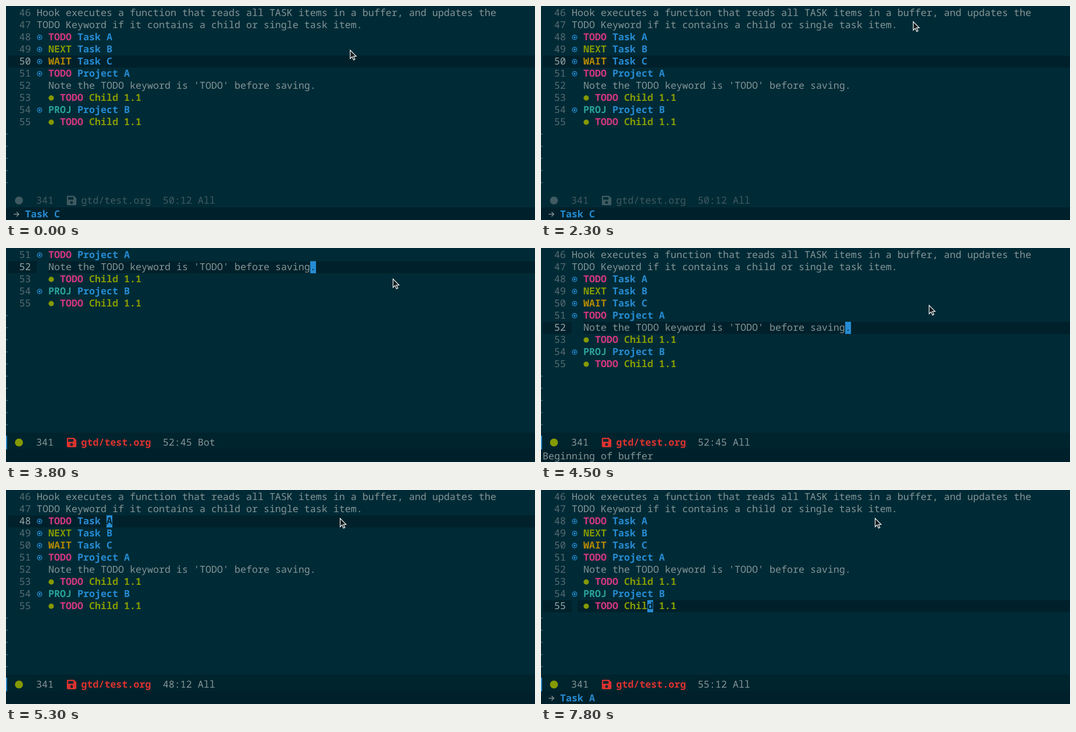
Write an HTML page that moves like this. It is 1000 by 406 pixels and loops after 8 s.

```html
<!DOCTYPE html>
<html lang="en">
<head>
<meta charset="utf-8">
<title>Task buffer</title>
<style>
  html, body { margin: 0; width: 100%; height: 100%; overflow: hidden; background: #002b36; }
  svg { display: block; width: 1000px; height: 406px; }
  text {
    font: 18.333px "Fira Code", "Fira Mono", "Noto Sans Mono", "DejaVu Sans Mono", monospace;
    text-rendering: geometricPrecision;
    white-space: pre;
    font-variant-ligatures: none;
    fill: #839496;
  }
  .bold { font-weight: 700; }
  .num { fill: #566b73; }
  .num.current { fill: #96a7a9; }
  .TODO { fill: #d33682; }
  .NEXT { fill: #859900; }
  .WAIT { fill: #b58900; }
  .PROJ { fill: #2aa198; }
  .level1 { fill: #268bd2; }
  .level2 { fill: #859900; }
  .bg { fill: #002b36; }
  .dark { fill: #00212b; }
  .blue { fill: #268bd2; }
  #cursor text { fill: #00212b; }

  #bar .back { fill: #002b36; }
  #bar .accent { fill: none; }
  #bar text, #bar .dot, #bar .disk { fill: #405a61; }
  #bar.active .back { fill: #00242e; }
  #bar.active .accent { fill: #268bd2; }
  #bar.active text { fill: #839496; }
  #bar.active .dot { fill: #859900; }
  #bar.active .disk, #bar.active .file { fill: #dc322f; }
  #bar.active .file { font-weight: 700; }
</style>
</head>
<body>
<svg viewBox="0 0 1000 406">
  <rect class="bg" width="1000" height="406"/>
  <g id="buffer">
    <rect id="line" class="dark" x="3" width="997" height="23"/>
    <g id="rows"></g>
    <g id="cursor">
      <rect class="blue" width="11" height="23"/>
      <text y="17"></text>
    </g>
  </g>
  <g id="bar">
    <rect class="back" y="350" width="1000" height="33"/>
    <rect class="accent" y="356" width="2" height="27"/>
    <circle class="dot" cx="24.5" cy="369" r="7.6"/>
    <text x="57" y="375">341</text>
    <path class="disk" fill-rule="evenodd" d="M117 360H128.500L133 364.500V376Q133 378 131 378H117Q115 378 115 376V362Q115 360 117 360ZM117.500 362.500V367.500H127.500V362.500ZM124 370.300a2.600 2.600 0 1 0 .01 0Z"/>
    <text class="file" x="142" y="375">gtd/test.org</text>
    <text id="place" x="296.500" y="375"></text>
  </g>
  <rect class="dark" y="383" width="1000" height="23"/>
  <rect y="382" width="1000" height="1" fill="#001e27"/>
  <g id="echo">
    <path d="M14.500 395H24M20 390.700L24.300 395L20 399.300" fill="none" stroke="#839496" stroke-width="1.500"/>
    <text class="bold level1" x="36" y="401"></text>
  </g>
  <text id="message" x="3" y="401">Beginning of buffer</text>
  <g id="mouse">
    <path id="arrow" d="M.600 .800V16.800L4.400 13.300L7.100 19.400L9.700 18.200L7 12.300H12Z" fill="#141c1f" stroke="#fff" stroke-width="1.200"/>
    <g id="beam" fill="none">
      <path d="M-3.500 -6.500H3.500M0 -6.500V6.500M-3.500 6.500H3.500" stroke="#0b1518" stroke-width="3.200"/>
      <path d="M-3.500 -6.500H3.500M0 -6.500V6.500M-3.500 6.500H3.500" stroke="#fff" stroke-width="1.500"/>
    </g>
  </g>
</svg>
<script>
const LOOP = 8000, ROW = 23, CELL = 11, LEFT = 58, TOP = 2, FIRST = 46;
const $ = id => document.getElementById(id);
const colX = col => LEFT + col * CELL;
const lineY = num => TOP + (num - FIRST) * ROW;

function add(parent, tag, attrs, content = '') {
  const node = document.createElementNS('http://www.w3.org/2000/svg', tag);
  for (const key in attrs) node.setAttribute(key, attrs[key]);
  node.textContent = content;
  return parent.appendChild(node);
}

const plain = (text, indent = 0) => ({ text, indent, pad: indent });
const head = (level, key, title) => ({ level, key, title, indent: level - 1, pad: 2 * (level - 1) });
const lines = [
  plain('Hook executes a function that reads all TASK items in a buffer, and updates the'),
  plain('TODO Keyword if it contains a child or single task item.'),
  head(1, 'TODO', 'Task A'),
  head(1, 'NEXT', 'Task B'),
  head(1, 'WAIT', 'Task C'),
  head(1, 'TODO', 'Project A'),
  plain("Note the TODO keyword is 'TODO' before saving.", 2),
  head(2, 'TODO', 'Child 1.1'),
  head(1, 'PROJ', 'Project B'),
  head(2, 'TODO', 'Child 1.1')
];

function drawLine(line, i) {
  const g = add($('rows'), 'g', { transform: `translate(0 ${TOP + i * ROW})` });
  const write = (col, text, cls) => add(g, 'text', { x: colX(col), y: 17, class: cls }, text);
  if (line.indent) add(g, 'rect', { class: 'bg', x: LEFT, width: line.indent * CELL, height: ROW });
  line.num = add(g, 'text', { x: 25, y: 17, class: 'num' }, FIRST + i);
  if (!line.level) return write(line.pad, line.text, '');

  const cx = colX(line.pad) + 5.5, cls = 'level' + line.level;
  if (line.level === 1) {
    add(g, 'circle', { cx, cy: 11.5, r: 4.3, fill: 'none', stroke: '#268bd2', 'stroke-width': 1.4 });
    add(g, 'circle', { cx, cy: 11.5, r: 1.9, class: cls });
  } else {
    add(g, 'circle', { cx, cy: 11.5, r: 5, class: cls });
  }
  write(line.pad + 2, line.key, 'bold ' + line.key);
  write(line.pad + 7, line.title, 'bold ' + cls);
}
lines.forEach(drawLine);

// Marks beside the empty lines
for (let i = lines.length; i < 20; i++) {
  const y = TOP + i * ROW + 11;
  add($('rows'), 'path', { d: `M0 ${y}h2l1 .6`, fill: 'none', stroke: '#74888b', 'stroke-width': 1.1 });
}

// Each entry changes part of the editor state from its time on.
const events = [
  [0, { top: 46, num: 50, mark: 50, col: 12, active: false, place: '50:12 All', echo: 'Task C', message: false }],
  [3000, { top: 51, num: 51, mark: 51, place: '51:12 Bot' }],
  [3200, { num: 52, mark: 52, col: 45, active: true, place: '52:45 Bot', echo: '' }],
  [4100, { top: 46, place: '52:45 All' }],
  [4200, { message: true }],
  [5100, { num: 48, col: 12, message: false }],
  [5300, { mark: 48, place: '48:12 All' }],
  [5900, { echo: 'Task A' }],
  ...[[6700, 49], [7000, 51], [7200, 52], [7400, 53], [7600, 54], [7800, 55]]
    .map(([time, num]) => [time, { num, mark: num, place: num + ':12 All' }])
];

// Pointer samples: start time, then one position every 100 ms
const strokes = [
  [0, [650, 83], [637, 75], [613, 72], [585, 84], [564, 98]],
  [600, [566, 100], [575, 105], [581, 107]],
  [1000, [553, 122], [522, 136], [502, 147], [540, 165], [605, 168], [690, 160], [764, 130], [752, 92], [722, 68]],
  [1900, [713, 57]],
  [2200, [707, 42], [703, 29]],
  [3700, [716, 40], [731, 58], [732, 75], [730, 88], [729, 95], [728, 98]],
  [4400, [731, 103], [733, 108]],
  [4800, [722, 94], [686, 72], [648, 56], [631, 53]]
];

function pointerAt(t) {
  const [start, ...points] = strokes.filter(s => s[0] <= t).pop();
  return points[Math.min(points.length - 1, Math.floor((t - start) / 100))];
}

function stateAt(t) {
  return Object.assign({}, ...events.filter(e => e[0] <= t).map(e => e[1]));
}

const show = (node, on) => node.setAttribute('visibility', on ? 'visible' : 'hidden');
const move = (node, x, y) => node.setAttribute('transform', `translate(${x} ${y})`);

function render(t) {
  const s = stateAt(t), line = lines[s.num - FIRST];
  move($('buffer'), 0, (FIRST - s.top) * ROW);
  $('line').setAttribute('y', lineY(s.mark));
  lines.forEach(l => l.num.classList.toggle('current', l === line));

  const full = ' '.repeat(line.pad) + (line.level ? `* ${line.key} ${line.title}` : line.text);
  const col = s.col + line.indent, glyph = $('cursor').lastElementChild;
  move($('cursor'), colX(col), lineY(s.num));
  glyph.textContent = full[col];
  glyph.setAttribute('class', line.level ? 'bold' : '');
  show($('cursor'), s.active);

  $('bar').setAttribute('class', s.active ? 'active' : '');
  $('place').textContent = s.place;
  $('echo').lastElementChild.textContent = s.echo;
  show($('echo'), s.echo);
  show($('message'), s.message);

  const [x, y] = pointerAt(t);
  const overText = y >= 140 && y < 163 && x < 586;
  move($('mouse'), x, y);
  show($('arrow'), !overText);
  show($('beam'), overText);
}

const start = performance.now();
function tick() {
  render((performance.now() - start) % LOOP);
  requestAnimationFrame(tick);
}
tick();
</script>
</body>
</html>
```
